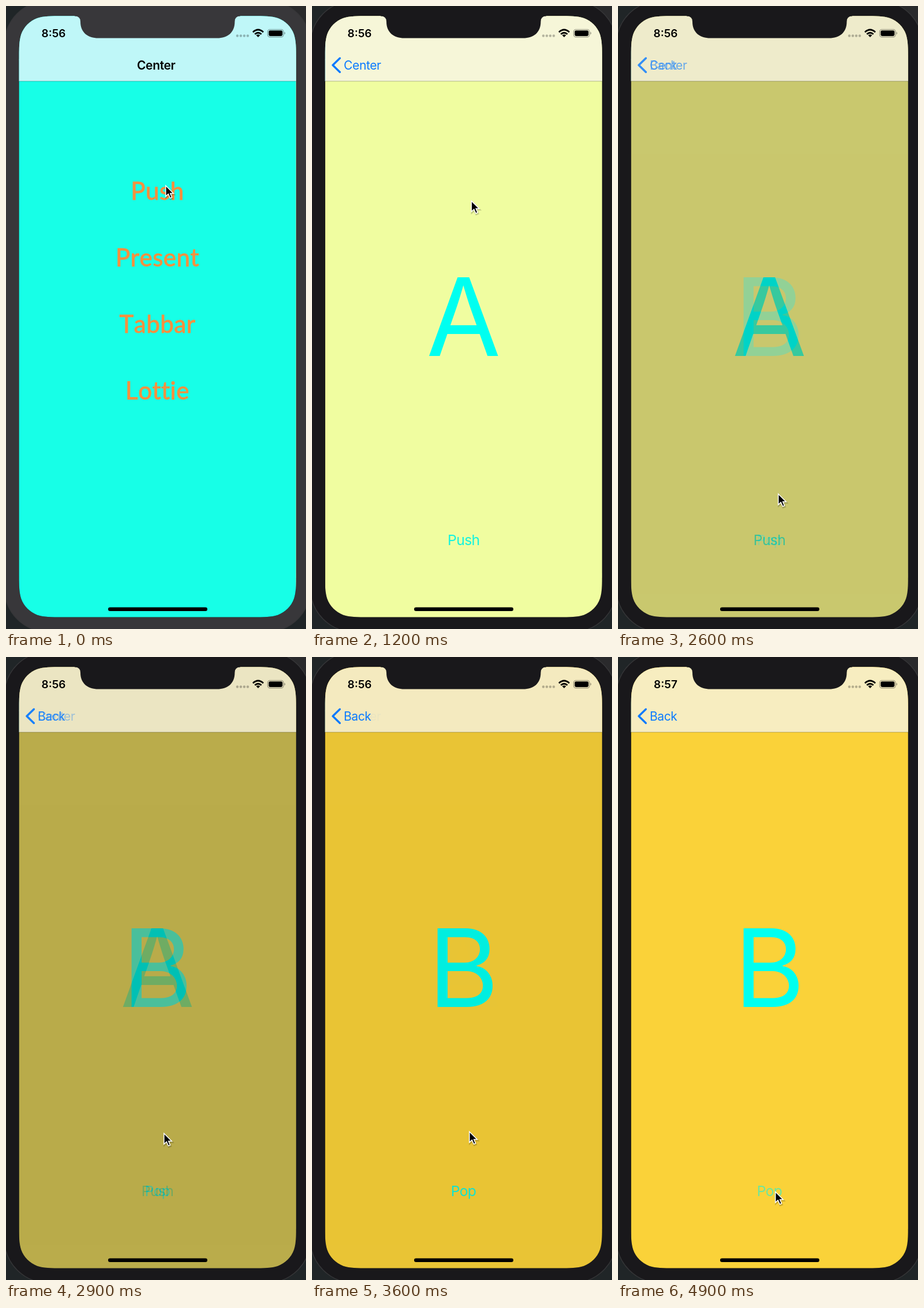
These frames come from a looping animation (520 px wide and 1077 px high, 5000 ms). An HTML page:

```html
<!DOCTYPE html>
<html lang="en">
<head>
<meta charset="utf-8">
<title>Page transitions</title>
<style>
  html, body { margin: 0; width: 100%; height: 100%; overflow: hidden; background: #202527; }
  svg { display: block; width: 100vw; height: 100vh; font-family: Inter, sans-serif; }
  .menu { font: 42px Lato, sans-serif; font-kerning: none; letter-spacing: .5px; fill: #f5903f; stroke: #f5903f; stroke-width: .9; text-anchor: middle; }
  .letter { font-size: 187px; fill: #00fff0; text-anchor: middle; }
  .link { font-size: 24.8px; letter-spacing: -.7px; fill: #14f3df; text-anchor: middle; }
  .title { font-size: 21px; font-weight: 600; letter-spacing: -.35px; }
  .back { font-size: 21px; letter-spacing: -.4px; fill: #0a7aff; }
  .clock { font-size: 19px; font-weight: 600; text-anchor: middle; }
  .chevron { fill: none; stroke: #0a7aff; stroke-width: 3.4; stroke-linecap: round; stroke-linejoin: round; }
</style>
</head>
<body>
<svg viewBox="0 0 520 1077" preserveAspectRatio="none">
  <defs>
    <clipPath id="screen"><path id="screenShape"/></clipPath>
    <linearGradient id="barFill" gradientUnits="userSpaceOnUse" y1="0" y2="0">
      <stop offset="0" stop-color="rgb(191,247,248)"/>
      <stop id="barColor" offset="1"/>
    </linearGradient>
    <path id="chevron" class="chevron" d="M48.3 90.3 36 102.3 48.3 114.3"/>
  </defs>

  <rect width="520" height="1077" fill="#202527"/>
  <rect x="260" width="260" height="70" fill="#2a2a2c"/>
  <rect id="bezel" x="-3" y="-9" width="531" height="1091" rx="76" stroke="#363638" stroke-width="1.5"/>

  <g clip-path="url(#screen)">
    <rect width="520" height="1077"/>
    <g id="center">
      <rect x="22" y="17" width="640" height="1040" fill="#17ffe7"/>
      <g class="menu">
        <text id="menuPush" x="262.5" y="335">Push</text>
        <text x="262.5" y="450">Present</text>
        <text x="262.5" y="565">Tabbar</text>
        <text x="262.5" y="680">Lottie</text>
      </g>
    </g>
    <rect id="dim" width="520" height="1077"/>
    <g id="pageA">
      <rect x="22.500" y="17" width="481" height="1040" fill="#f0fda0"/>
      <text class="letter" x="262.5" y="605">A</text>
      <text id="linkA" class="link" x="262.5" y="932">Push</text>
    </g>
    <g id="pageB">
      <rect x="22.500" y="17" width="481" height="1040" fill="#fad239"/>
      <text class="letter" x="262.5" y="605">B</text>
      <text id="linkB" class="link" x="262.5" y="932">Pop</text>
    </g>

    <rect x="22" y="17" width="482" height="113" fill="url(#barFill)"/>
    <rect x="22" y="129.5" width="482" height="1" fill-opacity=".27"/>
    <g id="backCenter">
      <use href="#chevron"/>
      <text id="centerLabel" class="back" y="109.8">Center</text>
    </g>
    <g id="backBack">
      <use href="#chevron"/>
      <text class="back" x="55" y="109.8">Back</text>
    </g>
    <text id="title" class="title" y="109.8">Center</text>

    <text id="clock" class="clock" x="82.5" y="54"></text>
    <g fill-opacity=".27">
      <circle cx="401" cy="51.5" r="2.2"/><circle cx="407" cy="51.5" r="2.2"/>
      <circle cx="413" cy="51.5" r="2.2"/><circle cx="419" cy="51.5" r="2.2"/>
    </g>
    <g fill="none" stroke="#000" stroke-width="2.8">
      <path d="M428 45.2Q437 36.8 446 45.2M431.3 48.8Q437 43.6 442.7 48.8"/>
      <path d="M433.6 50.6Q437 47.8 440.4 50.6L437 54Z" fill="#000" stroke="none"/>
    </g>
    <rect x="453.5" y="40.5" width="27.5" height="13.2" rx="4" fill="none" stroke="#000" stroke-opacity=".4" stroke-width="1.2"/>
    <rect x="455.3" y="42.2" width="24" height="9.8" rx="2.4"/>
    <path d="M482.6 44.6Q485.4 47.1 482.6 49.6Z" fill-opacity=".45"/>
    <rect x="177" y="1039.4" width="172" height="6.6" rx="3.3"/>
  </g>

  <path id="notch" d="M119 15.5V17.5Q129 17.5 129 27C129 46 142 55.5 160 55.5H366C384 55.5 396.5 46 396.5 27Q396.5 17.5 406 17.5V15.5Z"/>

  <g id="cursor">
    <path d="M0 0V18.5L4.5 14.6 7.6 21.6 10.8 20.3 7.9 13.4H13.5Z" transform="translate(.8 1.8)" fill="none" stroke="#000" stroke-opacity=".18" stroke-width="3"/>
    <path d="M0 0V18.5L4.5 14.6 7.6 21.6 10.8 20.3 7.9 13.4H13.5Z" stroke="#fff" stroke-width="1.5"/>
  </g>
</svg>
<script>
const LOOP = 5000;
const el = {};
document.querySelectorAll('[id]').forEach(node => el[node.id] = node);

const set = (node, attrs) => { for (const name in attrs) node.setAttribute(name, attrs[name]); };
const smooth = x => { x = Math.min(1, Math.max(0, x)); return x * x * (3 - 2 * x); };

// Rectangle whose corners ease gradually into the sides.
function softRect(left, top, right, bottom, r) {
  const half = [[0, 1.529], [0, 1.088], [0, .868], [.075, .631], [.169, .373]];
  const corner = [...half, ...half.map(([x, y]) => [y, x]).reverse()];
  const place = (points, x, y, sx, sy) => {
    const [first, ...rest] = points.map(([u, v]) => `${x + sx * u * r} ${y + sy * v * r}`);
    return `L${first}C${rest.join(' ')}`;
  };
  const flipped = [...corner].reverse();
  return ('M' + place(corner, left, top, 1, 1).slice(1)
    + place(flipped, right, top, -1, 1)
    + place(corner, right, bottom, -1, -1)
    + place(flipped, left, bottom, 1, -1) + 'Z');
}

// Eased value at time t along [time, value] keys.
function track(t, keys) {
  let [time, value] = keys[0];
  for (const [nextTime, nextValue] of keys) {
    if (t < nextTime) return value + (nextValue - value) * smooth((t - time) / (nextTime - time));
    [time, value] = [nextTime, nextValue];
  }
  return value;
}

// Critically damped approach from 0 to 1.
function spring(t) {
  const x = Math.max(0, t) * 0.012;
  return 1 - (1 + x) * Math.exp(-x);
}

const BAR_DARK = [200, 195, 172], BAR_A = [246, 246, 216], BAR_B = [247, 237, 192];
const cursorX = [[0, 276], [1100, 276], [1900, 264], [2150, 264], [2600, 277], [2900, 273], [3600, 272]];
const cursorY = [[0, 309], [1100, 309], [1900, 911], [2150, 911], [2600, 842], [2900, 822], [3600, 819], [3900, 819], [4600, 923]];

set(el.screenShape, { d: softRect(22.6, 17.3, 502.8, 1056.4, 50) });

function draw(t) {
  const slide = spring(t - 377);
  const fade = smooth((t - 2040) / 1860);
  const shift = 480 * (1 - slide);
  const edge = 23 + shift;

  const body = t < 100 ? '#38373a' : '#19181b';
  set(el.bezel, { fill: body });
  set(el.notch, { fill: body });

  set(el.center, { transform: `translate(${-144 * slide} 0)`, opacity: slide > .999 ? 0 : 1 });
  set(el.dim, { opacity: .12 * slide });
  set(el.pageA, { transform: `translate(${shift} 0)`, opacity: 1 - fade });
  set(el.pageB, { opacity: fade });
  set(el.menuPush, { opacity: track(t, [[0, 1], [130, 1], [230, .2], [400, .2], [800, 1]]) });
  set(el.linkA, { opacity: track(t, [[0, 1], [2000, 1], [2100, .6], [2200, .5], [2500, 1]]) });
  set(el.linkB, { opacity: track(t, [[0, 1], [4800, 1], [4900, .6], [5000, .45]]) });

  // The blurred bar mixes the pages beneath it.
  const blur = Math.min(1, 5 * slide * (1 - slide)) + .01;
  set(el.barFill, { x1: edge - 13 * blur, x2: edge + 40 * blur });
  const mix = BAR_DARK.map((dark, i) =>
    Math.round(dark + fade * (BAR_B[i] - dark) + (1 - fade) ** 2 * (BAR_A[i] - dark)));
  set(el.barColor, { 'stop-color': `rgb(${mix})` });

  // The title lags a little behind the page as it becomes the back label.
  const titleMove = slide ** 1.2;
  const labelX = 227 - 172 * titleMove;
  set(el.title, { x: labelX, opacity: 1 - titleMove });
  set(el.centerLabel, { x: labelX });
  set(el.backCenter, { opacity: slide * track(t, [[0, 1], [2150, 1], [2600, .6], [2900, .35], [3600, .04], [3900, 0]]) });
  set(el.backBack, { opacity: track(t, [[0, 0], [2150, 0], [2600, .55], [2900, .9], [3300, 1]]) });

  el.clock.textContent = t < 4300 ? '8:56' : '8:57';
  set(el.cursor, { transform: `translate(${track(t, cursorX) + .8} ${track(t, cursorY) + 1.5})` });
}

const start = performance.now();
function frame() {
  draw((performance.now() - start) % LOOP);
  requestAnimationFrame(frame);
}
frame();
</script>
</body>
</html>
```
